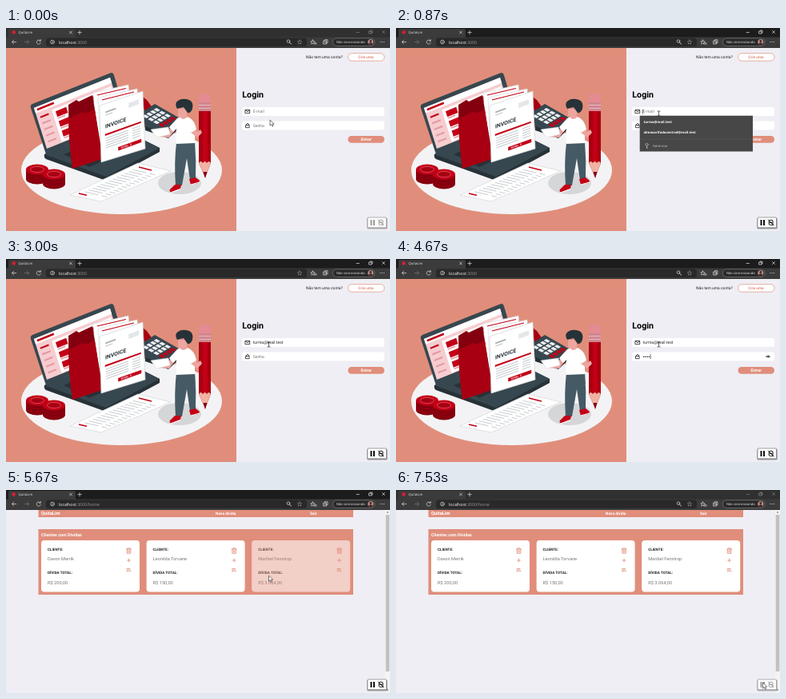
An HTML page that plays this animation: 480 by 254 pixels, repeating every 7.59 s.

```html
<!DOCTYPE html>
<html lang="pt-BR">
<head>
<meta charset="utf-8">
<title>QuitaLim</title>
<style>
html, body { margin: 0; width: 100%; height: 100%; overflow: hidden; background: #efeef4; }
svg { display: block; width: 100vw; height: 100vh; }
text { font: 400 5.1px Roboto, sans-serif; text-rendering: geometricPrecision; white-space: pre; }
.b { font-weight: 700; }
.ui { font-family: "Open Sans", sans-serif; }
.mid { text-anchor: middle; }
.line { fill: none; stroke-linecap: round; stroke-linejoin: round; }
</style>
</head>
<body>
<svg viewBox="0 0 480 254">
  <rect width="480" height="254" fill="#efeef4"/>

  <g id="login">
    <rect y="24" width="288" height="230" fill="#e08e7b"/>
    <ellipse cx="144.500" cy="178" rx="125.500" ry="55" fill="#f3f3f5"/>
    <g id="laptop">
      <path d="M48 158L136 122L192 150V155L125 191L50 164Q47 162 48 158Z" fill="#263238"/>
      <path d="M48 158L136 122L192 150L125 186Z" fill="#37474f"/>
      <path d="M72 158L140 130L168 145L104 174Z" fill="#263238"/>
      <path d="M33 95L130 56.500Q134 55 135 59L151 114L50 158L31 100Q30 96 33 95Z" fill="#37474f"/>
      <g id="screen" transform="matrix(.95 -.38 .16 .51 35 100)">
        <rect width="100" height="100" fill="#f6cdd0"/>
        <rect width="100" height="13" fill="#fff"/>
        <rect x="3" y="4" width="22" height="5" fill="#c30016"/>
        <rect x="20" y="20" width="78" height="78" fill="#fff"/>
      </g>
    </g>
    <path d="M168 84L176 90L186 104L176 118Z" fill="#a80012"/>
    <path d="M109 81L153 71L160 140L114 150Z" fill="#fff" stroke="#cfd3d6" stroke-width=".6"/>
    <path d="M115 87L164 76L168 140L118 150Z" fill="#fff" stroke="#cfd3d6" stroke-width=".6"/>
    <path d="M114 84L150 75.500M120 90L160 80" stroke="#c30016" stroke-width="1.200"/>
    <path d="M78 96L88 90L91 92L108 84L121 163L83 176Q78 140 78 96Z" fill="#85000f"/>
    <path d="M78 114L96 105L100 107L111 102L120 164L83 176Q79 150 78 114Z" fill="#a80012"/>
    <g>
      <path d="M172 105L186 96L221 116V121L203 138L174 128Z" fill="#263238"/>
      <path d="M172 104L186 95L221 115L203 133L174 123Z" fill="#37474f"/>
      <g id="calculator" transform="matrix(1 .55 -.7 .42 188 100)"></g>
    </g>
    <path d="M117 97L171 79L174 151L119 168Z" fill="#fff" stroke="#d0d4d6" stroke-width=".7"/>
    <g id="invoice" transform="matrix(1 -.36 .02 1 117 97)">
      <text class="b" x="6.500" y="31" style="font-size:6.800px" fill="#263238">INVOICE</text>
      <rect x="7" y="10" width="13" height="2" fill="#aab3b8"/>
      <rect x="7" y="14" width="9" height="1.200" fill="#c5cbce"/>
      <rect x="36" y="10" width="13" height="6" fill="#e4e7e9"/>
      <rect x="6" y="38" width="45" height="2.200" fill="#c30016"/>
      <rect x="22" y="60" width="29" height="4.300" fill="#c30016"/>
      <text class="b" x="25" y="63.400" style="font-size:3.300px" fill="#fff">TOTAL  $</text>
    </g>
    <path d="M80 209L165 169L206 179L119 217Z" fill="#fff" stroke="#d3d6d8" stroke-width=".7"/>
    <g id="receipt" class="line" stroke="#b9bfc3" stroke-width=".8"></g>
    <path d="M166 174L182 178M91 207L101 209.300" stroke="#c30016" stroke-width="1.600"/>
    <g id="coins"></g>
    <ellipse cx="217" cy="194" rx="27" ry="14" fill="#d5d6d8"/>
    <g id="pencil">
      <path d="M241 94V85Q241 82 248.500 82T256 85V94Z" fill="#e48a91"/>
      <path d="M241 93H256V104H241Z" fill="#cf8790"/>
      <path d="M241 96.500H256M241 100.500H256" stroke="#eab8be" stroke-width="1.100"/>
      <path d="M241 104H256V169L249 187L241 169Z" fill="#a80012"/>
      <path d="M246 104H252V168H246Z" fill="#c30016"/>
      <path d="M241 169Q243.500 165 246 169Q248.500 165 251 169Q253.500 165 256 169L249 187Z" fill="#f0b2a3"/>
      <path d="M246.500 180L249 188L251.400 180Z" fill="#85000f"/>
    </g>
    <g id="person">
      <path d="M213 143L236 142Q238 166 237 189L230 190L226 163L220 197H212Q210 168 213 143Z" fill="#455a64"/>
      <path d="M211 196H219L218 201L206 206Q203 203 206 201ZM229 189L237 187L242 191L241 194L231 196Z" fill="#c30016"/>
      <path d="M205 206.300L218 201.500M231 196L242 193" stroke="#fff" stroke-width="1.200"/>
      <path d="M210 119L214 124L204 137L188 136L185 132L201 131Z" fill="#eda5a0"/>
      <path d="M181 127L203 124L205 133L188 137Z" fill="#fff" stroke="#d3d6d8" stroke-width=".5"/>
      <path d="M214 113Q220 109 229 112Q237 117 236 144L213 145Q212 132 213 126L209 130L204 124Z" fill="#fff"/>
      <path d="M215 101H226V112Q221 116 218 112L215 110Z" fill="#eda5a0"/>
      <path d="M214 101Q210 94 215 91Q220 87 229 90Q235 93 233 101Q231 107 227 106L222 99Z" fill="#263238"/>
      <path d="M232 121L239 130L243 127L245 131L239 137L230 130Z" fill="#eda5a0"/>
      <path d="M230 113Q236 116 238 127L231 131L226 123Z" fill="#fff"/>
    </g>

    <text x="375" y="38.300" style="font-size:4.950px" fill="#222">Não tem uma conta?</text>
    <rect x="427.500" y="31.700" width="45.500" height="9.500" rx="4.700" fill="#fff" stroke="#e08e7b" stroke-width=".7"/>
    <text class="mid b" x="450" y="38.200" style="font-size:4.800px" fill="#e08e7b">Crie uma</text>
    <text class="b" x="295.300" y="86.800" style="font-size:10.700px">Login</text>
    <rect x="295" y="99" width="178" height="11" rx="2.500" fill="#fff"/>
    <rect x="295" y="116.500" width="178" height="11" rx="2.500" fill="#fff"/>
    <g class="line" stroke="#222" stroke-width=".8">
      <path d="M299.300 102.500H304.700V106.700H299.300ZM299.300 102.700L302 104.900L304.700 102.700"/>
      <path d="M299.900 121.500H304.100V124.700H299.900ZM300.600 121.500V120.300Q302 118 303.400 120.300V121.500"/>
    </g>
    <text id="email" x="308.700" y="106.400"></text>
    <text id="hint" x="308.700" y="123.800" fill="#777">Senha</text>
    <g id="dots"></g>
    <rect id="caret" width=".6" height="6" fill="#111"/>
    <g id="eye" class="line" stroke="#333" stroke-width=".7">
      <path d="M462.800 122Q465.200 119.400 467.600 122Q465.200 124.600 462.800 122Z"/>
      <circle cx="465.200" cy="122" r=".7"/>
    </g>
    <rect x="427.500" y="135" width="45.500" height="8.700" rx="4.300" fill="#e08e7b"/>
    <text class="mid b" x="450.300" y="141.100" fill="#fff">Entrar</text>
    <g id="suggestions">
      <rect id="suggestBox" x="304.700" y="109.700" width="141.300" fill="#474747"/>
      <text class="ui b" x="309.500" y="119.300" style="font-size:4.200px" fill="#fff">turma@mail.test</text>
      <text id="second" class="ui b" x="309.500" y="132.400" style="font-size:4.200px" fill="#fff">almoxarifadocentral@mail.test</text>
      <g id="manage">
        <path d="M305 -9.500H446" stroke="#5b5b5b" stroke-width=".5"/>
        <g class="line" stroke="#ccc" stroke-width=".6"><circle cx="313.500" cy="-2.800" r="1.600"/><path d="M313.500 -1.200V2M313.500 1H314.500"/></g>
        <text class="ui" x="321" y="0" style="font-size:4.100px" fill="#ccc">Gerenciar</text>
      </g>
    </g>
  </g>

  <g id="home">
    <path d="M40.500 24H434V34H40.500ZM40.500 49H434V131H40.500Z" fill="#e08e7b"/>
    <g fill="#fff">
      <text class="b" x="44" y="31.300" style="font-size:5.800px">QuitaLim</text>
      <text class="b" x="262" y="31.300" style="font-size:4.800px">Nova dívida</text>
      <text class="b" x="380" y="31.300" style="font-size:4.800px">Sair</text>
      <text class="b" x="44" y="58" style="font-size:5.400px">Clientes com Dívidas</text>
    </g>
    <g id="cards"></g>
    <rect x="474" y="24" width="6" height="230" fill="#f4f4f4"/>
    <rect x="474.700" y="31" width="4.600" height="196" fill="#c1c1c1"/>
    <path d="M475.500 28.500L477 26.800L478.500 28.500ZM475.500 249.500L477 251.200L478.500 249.500Z" fill="#777"/>
  </g>

  <g id="browser">
    <rect id="titleBar" width="480" height="12"/>
    <path d="M3 12V3Q3 1 5 1H85Q87 1 87 3V12Z" fill="#3b3b3b"/>
    <rect y="11.500" width="480" height="13.500" fill="#3b3b3b"/>
    <circle cx="9.700" cy="5.400" r="2.300" fill="#d31f35"/>
    <text class="ui" x="15.500" y="7.300" style="font-size:4.200px" fill="#eee">QuitaLim</text>
    <rect x="50" y="12.500" width="326" height="10.500" rx="3" fill="#292929"/>
    <text class="ui" x="66" y="19.500" fill="#fff" style="font-size:5.200px">localhost<tspan id="path" fill="#999"></tspan></text>
    <path id="controls" class="line" stroke="#ddd" stroke-width=".7" d="M438 5.500H441.500M454 4H457V7H454ZM455 4V3H458V6H457M470.500 3.500L473.500 6.500M473.500 3.500L470.500 6.500"/>
    <g class="line" stroke="#ddd" stroke-width=".7">
      <path d="M79.500 4L82.500 7M82.500 4L79.500 7M89.700 5.600H94.300M92 3.300V7.900"/>
      <path d="M12.700 17.500H7.500L9.700 15.200M7.500 17.500L9.700 19.800"/>
      <path d="M23.500 17.500H28.700L26.500 15.200M28.700 17.500L26.500 19.800" stroke="#777"/>
      <path d="M43 16A2.600 2.600 0 1 0 43.300 18.600M43.300 14.500V16.200H41.500"/>
      <circle cx="58" cy="17.500" r="2.400"/><path d="M58 17.300V18.700M58 16.200V16.300"/>
      <g id="zoom"><circle cx="353" cy="16.600" r="1.800"/><path d="M354.400 18L356.500 20" stroke-width="1"/></g>
      <path d="M367 14.900L367.800 16.700L369.700 16.900L368.300 18.200L368.700 20.100L367 19.100L365.300 20.100L365.700 18.200L364.300 16.900L366.200 16.700Z" stroke="#888"/>
      <path d="M383.500 14.900L384.300 16.700L386.200 16.900L384.800 18.200L385.200 20.100L383.500 19.100L381.800 20.100L382.200 18.200L380.800 16.900L382.700 16.700ZM386 18.700H388M386 20H388"/>
      <path d="M397 16H400.500V20H397ZM398.500 16V14.700H402V18.700H400.500M398 18H399.600"/>
      <path d="M468 17.500H468.100M470.200 17.500H470.300M472.400 17.500H472.500" stroke-width="1"/>
    </g>
    <rect x="408.500" y="12.800" width="52.500" height="9.700" rx="4.800" fill="#292929" stroke="#888" stroke-width=".6"/>
    <text class="ui" x="413" y="19.300" style="font-size:4.100px" fill="#eee">Não sincronizando</text>
    <circle cx="455.800" cy="17.600" r="3.600" fill="#b98d8a"/>
    <path d="M452.800 19.700Q455.800 16.700 458.800 19.700Q455.800 22.600 452.800 19.700Z" fill="#42272a"/>
    <circle cx="455.800" cy="16.500" r="1.400" fill="#42272a"/>
  </g>

  <g id="widget">
    <rect x="451.300" y="237.500" width="25.500" height="14" rx="1.500" fill="#000" opacity=".35"/>
    <rect x="452" y="237" width="23.500" height="12.800" rx="1" fill="#fff" stroke="#666" stroke-width=".6"/>
    <g id="widgetIcons">
      <path d="M455.500 240H457.500V247H455.500ZM459 240H461V247H459Z" fill="#111"/>
      <path class="line" stroke="#111" stroke-width="1" d="M466.500 241Q468.700 239 471 241V246Q468.700 247.500 466.500 246ZM465.500 240L472 247M467.500 243.500H470"/>
    </g>
  </g>
  <path id="arrow" d="M0 0V7.200L1.700 5.700L2.900 8.200L4.100 7.600L2.900 5.200H5.200Z" fill="#fff" stroke="#222" stroke-width=".6"/>
  <path id="beam" class="line" d="M-1.500 -3H-.400L0 -2.500L.4 -3H1.500M0 -2.500V2.500M-1.500 3H-.400L0 2.500L.4 3H1.500" stroke="#222" stroke-width=".7"/>
</svg>
<script>
const LOOP = 7590;
const $ = id => document.getElementById(id);
const add = (id, markup) => $(id).insertAdjacentHTML('beforeend', markup);
const repeat = (count, make) => Array.from({ length: count }, (_, i) => make(i)).join('');
const rect = (x, y, w, h, fill) => `<rect x="${x}" y="${y}" width="${w}" height="${h}" fill="${fill}"/>`;

add('screen', repeat(12, i => {
  const x = 24 + i % 4 * 18, y = 26 + Math.floor(i / 4) * 24;
  return rect(x, y, 14, 14, '#c30016') + rect(x, y + 16, 10, 3, '#e59aa2');
}) + repeat(5, i => rect(4, 24 + i * 15, 11, 4, i ? '#e59aa2' : '#c30016')));
add('calculator', repeat(16, i => rect(i % 4 * 6.6, Math.floor(i / 4) * 6.6, 4.9, 4.9, i % 4 === 3 ? '#c30016' : '#eceff1')));
add('invoice', repeat(5, i => rect(7, 43 + i * 3, 28, 1, '#c0c7cb') + rect(40, 43 + i * 3, 10, 1, '#c0c7cb')));
add('receipt', repeat(13, i => {
  const x = 99 + i * 5, y = 205 - i * 2.3;
  return `<path d="M${x} ${y}l16 3.700m5 1.200l6 1.400"/>`;
}));

function coinStack(x, y, count) {
  return repeat(count, i => {
    const top = y - i * 4;
    return `<path d="M${x - 14} ${top}v4a14 6.500 0 0 0 28 0v-4" fill="#85000f"/>
      <ellipse cx="${x}" cy="${top}" rx="14" ry="6.500" fill="#c30016"/>`;
  }) + `<ellipse cx="${x}" cy="${y - count * 4 + 4}" rx="8.500" ry="3.600" fill="#a80012" stroke="#e0566a" stroke-width=".8"/>`;
}
add('coins', coinStack(39, 185, 3) + coinStack(60, 191, 3));
add('dots', repeat(4, i => `<circle cx="${309.6 + i * 2.3}" cy="122.200" r=".8" fill="#222"/>`));

const clients = [['Davon Merrik', '200,00'], ['Leonilda Torvane', '150,00'], ['Maribel Fenstrop', '3.064,00']];
add('cards', clients.map(([name, debt], i) => `<g id="card${i}" transform="translate(${44 + i * 131.6} 63)">
  <rect width="123" height="64.500" rx="4" fill="#fff"/>
  <text class="b" x="8" y="13" style="font-size:4.600px" fill="#222">CLIENTE:</text>
  <text x="8" y="24.800" style="font-size:5.600px" fill="#777">${name}</text>
  <text class="b" x="8" y="42.400" style="font-size:4.600px" fill="#222">DÍVIDA TOTAL:</text>
  <text x="8" y="54.500" style="font-size:5.700px" fill="#777">R$ ${debt}</text>
  <g class="line" stroke="#e08e7b" stroke-width=".8">
    <path d="M106.500 11H112.500M108 11V9.800H111V11M107.200 11V16.300H111.800V11M108.800 12.500V15M110.200 12.500V15"/>
    <path d="M107.500 25H111.500M109.500 23V27"/>
    <path d="M107 35.500H111M107 37H111M107 38.500H109M110.500 38.500H112"/>
  </g></g>`).join(''));

const show = (id, on) => $(id).style.display = on ? '' : 'none';
const within = (t, from, to) => t >= from && t < to;
const ramp = (t, from, to) => Math.min(1, Math.max(0, (t - from) / (to - from)));
const ease = p => p * p * (3 - 2 * p);

// Pointer legs: start, end, dx, dy
const legs = [[130, 400, -1.5, -8], [6330, 6470, 45, 81], [6670, 7270, 85, 53]];

function draw(t) {
  const atHome = t >= 4730;
  const active = within(t, 730, 7530);
  show('login', !atHome);
  show('home', atHome);

  $('titleBar').setAttribute('fill', active ? '#1c1c1c' : '#303030');
  $('controls').setAttribute('opacity', active ? 1 : .45);
  $('path').textContent = atHome ? ':3000/home' : ':3000';
  show('zoom', !within(t, 1670, 3200));

  const filled = t >= 1670;
  $('email').textContent = filled ? 'turma@mail.test' : 'E-mail';
  $('email').setAttribute('fill', filled ? '#222' : '#777');
  show('suggestions', within(t, 800, 2200));
  $('suggestBox').setAttribute('height', filled ? 31.5 : 44.8);
  show('second', !filled);
  $('manage').setAttribute('transform', `translate(0 ${filled ? 135.5 : 148.7})`);

  const typed = [3200, 3670, 4000, 4200].filter(at => t >= at).length;
  [...$('dots').children].forEach((dot, i) => dot.style.display = i < typed ? '' : 'none');
  show('hint', !typed);
  show('eye', typed);
  const inEmail = t < 2400;
  show('caret', within(t, 800, 2200) || within(t, 2670, 2800) || within(t, 3200, 4730));
  const emailEnd = filled && !atHome ? 309 + $('email').getComputedTextLength() : 308.2;
  $('caret').setAttribute('x', inEmail ? emailEnd : 308.4 + typed * 2.35);
  $('caret').setAttribute('y', inEmail ? 101.6 : 119.2);

  const hover = ramp(t, 4730, 5000) - ramp(t, 6330, 6470);
  $('card2').setAttribute('opacity', 1 - .42 * hover);

  const awake = ramp(t, 130, 400) - ramp(t, 7130, 7270);
  $('widget').setAttribute('opacity', .8 + .2 * awake);
  $('widgetIcons').setAttribute('opacity', .5 + .5 * awake);

  let x = 330, y = 115;
  for (const [from, to, dx, dy] of legs) {
    const p = ease(ramp(t, from, to));
    x += dx * p;
    y += dy * p;
  }
  const overField = within(t, 330, 4730);
  show('beam', overField);
  show('arrow', !overField);
  $(overField ? 'beam' : 'arrow').setAttribute('transform', `translate(${x} ${y})`);
}

function tick() {
  draw(performance.now() % LOOP);
  requestAnimationFrame(tick);
}
tick();
</script>
</body>
</html>
```
